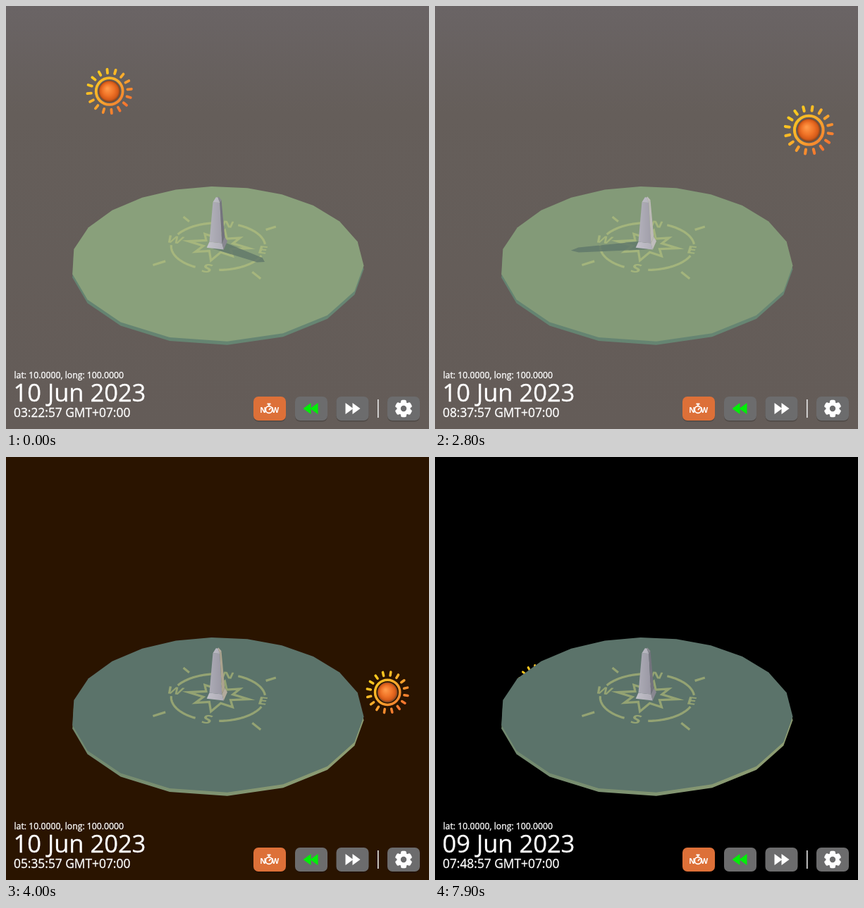
An HTML page with a canvas that plays this animation: 600x600 px, repeating every 8 s.

```html
<!DOCTYPE html>
<html lang="en">
<head>
<meta charset="utf-8">
<title>Sundial</title>
<style>
html, body { margin: 0; width: 100%; height: 100%; overflow: hidden; background: #000; }
canvas { display: block; width: 600px; height: 600px; }
</style>
</head>
<body>
<canvas id="stage" width="600" height="600"></canvas>
<script>
const g = document.getElementById('stage').getContext('2d');
const RAD = Math.PI / 180, TAU = Math.PI * 2;
const LOOP = 8000, STEP = 100;
const LAT = 10 * RAD, DECL = 23 * RAD, NOON = 739.5;
const YAW = 13 * RAD, TILT = 30 * RAD, PERSP = 0.35, SCALE = 266;
const FONT = '"Open Sans", "Noto Sans", sans-serif';
const GREY = '#6c6c6d', WHITE = '#fff';

// [ms, minutes since midnight of 10 Jun]
const CLOCK = [[0, 922], [800, 825], [2000, 639], [4000, 335], [7900, -252]];
// [sun height, sky colour]
const SKY = [[-0.27, [0, 0, 0]], [-0.1, [43, 20, 0]], [0.138, [92, 79, 62]], [0.5, [101, 94, 90]]];

const clamp = v => Math.max(0, Math.min(1, v));
const mix = (a, b, k) => a.map((v, i) => v + (b[i] - v) * k);
const rgb = c => `rgb(${c.map(Math.round).join()})`;

function between(keys, x) {
  let i = 1;
  while (i < keys.length - 1 && x > keys[i][0]) i++;
  const [a, b] = [keys[i - 1], keys[i]];
  return [a[1], b[1], clamp((x - a[0]) / (b[0] - a[0]))];
}

// east, north, up -> screen
function project(e, n, u, cx, cy) {
  const right = e * Math.cos(YAW) + n * Math.sin(YAW);
  const fwd = n * Math.cos(YAW) - e * Math.sin(YAW);
  const depth = fwd * Math.cos(TILT) - u * Math.sin(TILT);
  const s = SCALE / (1 + PERSP * depth);
  return [cx + s * right, cy - s * (u * Math.cos(TILT) + fwd * Math.sin(TILT)), s];
}

function sunVector(min) {
  const h = (min - NOON) / 4 * RAD, sd = Math.sin(DECL), cd = Math.cos(DECL);
  return [
    -cd * Math.sin(h),
    sd * Math.cos(LAT) - cd * Math.cos(h) * Math.sin(LAT),
    sd * Math.sin(LAT) + cd * Math.cos(h) * Math.cos(LAT)
  ];
}

// regular 20-gon seen in perspective
function discPoints(dy = 0) {
  const k = 0.24;
  return Array.from({ length: 20 }, (_, i) => {
    const a = (3 + i * 18) * RAD, w = 1 + k * Math.sin(a);
    return [
      300 + 207.5 * Math.cos(a) * Math.sqrt(1 - k * k) / w,
      366 + dy - 110 * (Math.sin(a) + k) / w
    ];
  });
}

function trace(pts, close = true) {
  g.beginPath();
  pts.forEach(([x, y]) => g.lineTo(x, y));
  if (close) g.closePath();
}

function poly(pts, fill) {
  trace(pts);
  g.fillStyle = fill;
  g.fill();
}

function circle(r, x = 0, y = 0) {
  g.beginPath();
  g.arc(x, y, r, 0, TAU);
}

function drawSky(up) {
  const base = mix(...between(SKY, up)), haze = clamp(up * 5 + 0.5);
  const grad = g.createLinearGradient(0, 0, 0, 600);
  grad.addColorStop(0, rgb(mix(base, [107, 102, 104], haze * 0.8)));
  grad.addColorStop(0.25, rgb(base));
  grad.addColorStop(1, rgb(mix(base, [98, 89, 84], haze * 0.4)));
  g.fillStyle = grad;
  g.fillRect(0, 0, 600, 600);
}

function drawSun(sun) {
  const [x, y, s] = project(...sun, 301, 336.5);
  g.save();
  g.translate(x, y);
  g.scale(s / SCALE, s / SCALE);
  const warm = g.createLinearGradient(-22, -22, 22, 22);
  warm.addColorStop(0, '#fdcb1e');
  warm.addColorStop(0.5, '#faa92d');
  warm.addColorStop(1, '#f5742f');
  g.strokeStyle = warm;
  g.lineCap = 'round';
  g.lineWidth = 3.8;
  const roll = (x - 300) / 26 * RAD;
  for (let i = 0; i < 16; i++) {
    const a = roll + i * TAU / 16, c = Math.cos(a), d = Math.sin(a);
    trace([[c * 26, d * 26], [c * 31.5, d * 31.5]], false);
    g.stroke();
  }
  circle(19);
  g.stroke();
  const ball = g.createRadialGradient(-3, -4, 1, 0, 0, 15.5);
  ball.addColorStop(0, '#ff9848');
  ball.addColorStop(0.5, '#f07428');
  ball.addColorStop(0.82, '#d65a18');
  ball.addColorStop(1, '#704426');
  g.fillStyle = ball;
  circle(15.5);
  g.fill();
  g.restore();
}

function drawShadow([e, n, u], color) {
  const flat = Math.hypot(e, n), reach = 0.287 / u * flat;
  const de = -e / flat, dn = -n / flat;
  const at = (d, w) => project(de * d - dn * w, dn * d + de * w, 0, 300, 339);
  g.save();
  trace(discPoints());
  g.clip();
  g.globalAlpha = 0.85;
  poly([at(0, 0.046), at(reach * 0.9, 0.026), at(reach, 0),
    at(reach * 0.9, -0.026), at(0, -0.046)], color);
  g.restore();
}

function drawCompass(color) {
  const ground = (e, n) => project(e, n, 0, 301, 338.5);
  const polar = (r, deg) => ground(r * Math.sin(deg * RAD), r * Math.cos(deg * RAD));
  g.strokeStyle = g.fillStyle = color;
  g.lineWidth = 3.2;
  g.lineCap = 'butt';
  g.lineJoin = 'miter';
  g.font = `bold 24px ${FONT}`;
  g.textAlign = 'center';
  [...'NESW'].forEach((ch, i) => {
    const q = i * 90, arc = [];
    for (let a = q + 14; a <= q + 76; a += 2) arc.push(polar(0.25, a));
    trace(arc, false);
    g.stroke();
    trace([polar(0.315, q + 45), polar(0.385, q + 45)], false);
    g.stroke();

    const e = 0.24 * Math.sin(q * RAD), n = 0.24 * Math.cos(q * RAD);
    const o = ground(e, n), x = ground(e + 0.01, n), y = ground(e, n - 0.01);
    g.save();
    g.transform((x[0] - o[0]) / 2.66, (x[1] - o[1]) / 2.66,
      (y[0] - o[0]) / 2.2, (y[1] - o[1]) / 2.2, o[0], o[1]);
    g.fillText(ch, 0, 8.6);
    g.restore();
  });
  const star = [];
  for (let i = 0; i < 16; i++) star.push(polar(i % 2 ? 0.08 : i % 4 ? 0.14 : 0.165, i * 22.5));
  trace(star);
  g.stroke();
}

// stacked square frustums, south and east faces
function drawObelisk([e, , u], light) {
  const levels = [[0.046, 0], [0.034, 0.03], [0.018, 0.255], [0.005, 0.278]];
  const corner = ([b, h], se, sn) => project(se * b, sn * b, h, 299.5, 338);
  const south = mix([158, 156, 168], [170, 168, 178], light);
  const east = clamp(e * 1.6) * clamp((u + 0.25) * 5);
  const lit = mix([192, 180, 148], [188, 185, 186], clamp(u * 1.6));
  const side = mix([116, 115, 126], lit, east);
  for (let i = 0; i < 3; i++) {
    const [lo, hi] = [levels[i], levels[i + 1]], glow = i === 1 ? 0 : 0.4;
    const face = mix(south, [225, 224, 230], glow);
    const grad = g.createLinearGradient(285, 0, 309, 0);
    grad.addColorStop(0, rgb(mix(face, [210, 209, 217], 0.35)));
    grad.addColorStop(1, rgb(mix(face, [125, 123, 135], 0.2)));
    poly([corner(lo, -1, -1), corner(hi, -1, -1), corner(hi, 1, -1), corner(lo, 1, -1)], grad);
    poly([corner(lo, 1, -1), corner(hi, 1, -1), corner(hi, 1, 1), corner(lo, 1, 1)],
      rgb(mix(side, [200, 198, 203], glow * 0.6)));
  }
}

function drawGround(sun) {
  const up = sun[2], light = clamp(1.06 * Math.pow(Math.max(0, up), 0.8));
  const dim = [91, 115, 106], low = clamp(1 - up * 2.5);
  const rim = g.createLinearGradient(93, 0, 507, 0);
  rim.addColorStop(0, rgb(mix([100, 131, 113], [112, 136, 111], low)));
  rim.addColorStop(1, rgb(mix([103, 134, 115], [143, 158, 115], low)));
  poly(discPoints(5), rim);
  poly(discPoints(), rgb(mix(dim, [149, 171, 127], light)));
  drawCompass(rgb(mix([148, 163, 115], [170, 187, 128], light)));
  if (up > 0.02) drawShadow(sun, rgb(mix(dim, [101, 123, 107], light)));
  drawObelisk(sun, light);
}

function button(x, color) {
  for (const [fill, dy] of [['rgba(0,0,0,.22)', 1.5], [color, 0]]) {
    g.fillStyle = fill;
    g.beginPath();
    g.roundRect(x, 554 + dy, 46, 34, 7);
    g.fill();
  }
}

function arrows(cx, dir, color) {
  for (const off of [-10, 0]) {
    const back = cx + dir * off;
    poly([[back, 563], [back + dir * 11, 571], [back, 579]], color);
  }
}

function drawNow() {
  g.fillStyle = g.strokeStyle = WHITE;
  g.font = `bold 10.5px ${FONT}`;
  g.textAlign = 'center';
  g.fillText('N', 364.5, 576.5);
  g.fillText('W', 382, 576.5);
  g.lineWidth = 1.8;
  circle(4.8, 373, 572.5);
  g.stroke();
  g.fillRect(370.5, 563.5, 5, 2);
  g.fillRect(372.2, 565, 1.6, 3);
  trace([[373, 573], [375.5, 570]], false);
  g.stroke();
}

function drawGear(x, y) {
  g.save();
  g.translate(x, y);
  g.fillStyle = WHITE;
  circle(9.6);
  g.fill();
  for (let i = 0; i < 6; i++) {
    g.beginPath();
    g.roundRect(-4, -12.2, 8, 8, 2.5);
    g.fill();
    g.rotate(TAU / 6);
  }
  g.fillStyle = GREY;
  circle(4.2);
  g.fill();
  g.restore();
}

function drawPanel(min) {
  const pad = v => String(v).padStart(2, '0');
  const day = min < 0 ? 9 : 10, m = (min + 1440) % 1440;
  const hour = Math.floor(m / 60) % 12 || 12;
  const line = (text, size, x, y) => {
    g.font = `${size}px ${FONT}`;
    g.fillText(text, x, y);
    g.strokeText(text, x, y);
  };
  g.fillStyle = g.strokeStyle = WHITE;
  g.lineWidth = 0.3;
  g.textAlign = 'left';
  line('lat: 10.0000, long: 100.0000', 12.25, 11.5, 528);
  line(`${pad(day)} Jun 2023`, 34.5, 10.5, 561);
  line(`${pad(hour)}:${pad(m % 60)}:57 GMT+07:00`, 17.35, 11, 583);

  button(351, '#dd7038');
  [410, 468.5, 541].forEach(x => button(x, GREY));
  drawNow();
  arrows(432.5, -1, '#00ee08');
  arrows(491.5, 1, WHITE);
  g.fillStyle = '#e8e8e8';
  g.fillRect(527, 558, 1.6, 26);
  drawGear(564, 571);
}

function render(ms) {
  const t = Math.floor(ms % LOOP / STEP) * STEP;
  const [a, b, k] = between(CLOCK, t);
  const min = Math.round(a + (b - a) * k);
  const sun = sunVector(min + 0.95);
  drawSky(sun[2]);
  drawSun(sun);
  drawGround(sun);
  drawPanel(min);
}

let start;
function tick(now) {
  start ??= now;
  render(now - start);
  requestAnimationFrame(tick);
}
render(0);
requestAnimationFrame(tick);
</script>
</body>
</html>
```
